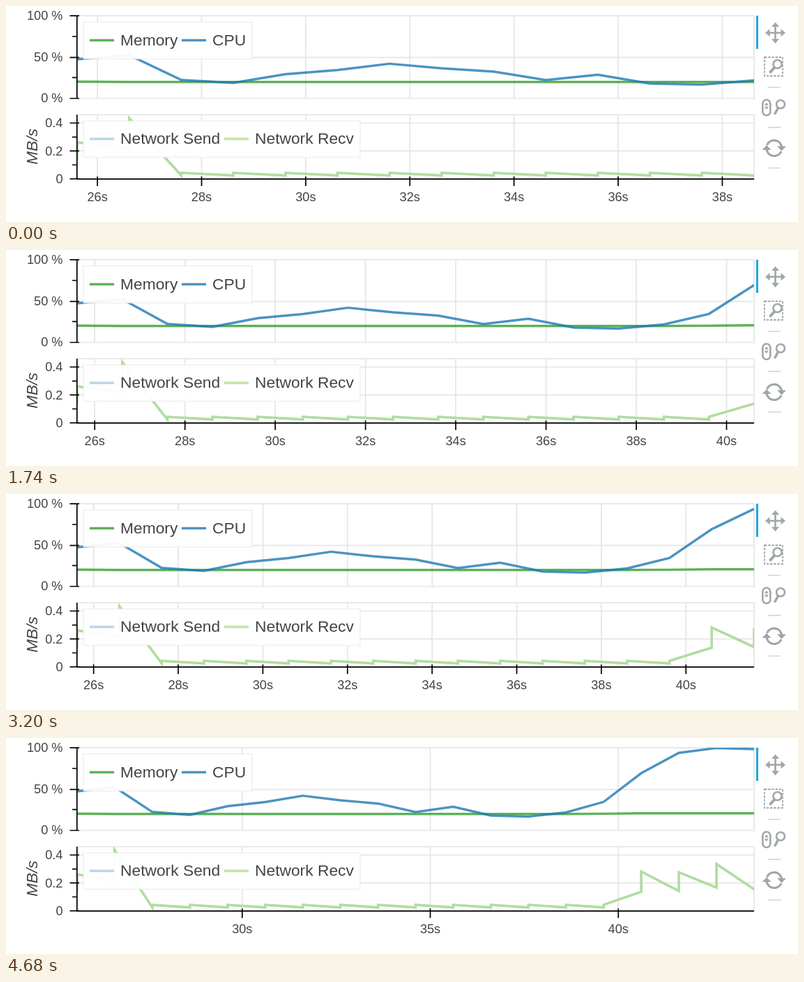
These frames come from a looping animation (1136 px wide and 312 px high, 4.94 s). An HTML page:

```html
<!DOCTYPE html>
<html lang="en">
<head>
<meta charset="utf-8">
<title>Resource monitor</title>
<style>
html, body { margin: 0; width: 100%; height: 100%; overflow: hidden; background: #fff; }
svg { display: block; width: 1136px; height: 312px; font: 18.2px "Liberation Sans", Arial, sans-serif; fill: #444; }
.grid, .frame { fill: none; stroke: #e5e5e5; stroke-width: 1.7; }
.axis { fill: none; stroke: #000; stroke-width: 1.7; }
.line { fill: none; stroke-width: 3.42; stroke-opacity: .8; stroke-miterlimit: 10; }
.mem { stroke: #33a02c; }
.cpu { stroke: #1f78b4; }
.send { stroke: #a6cee3; }
.recv { stroke: #b2df8a; }
.legend { font-size: 22.8px; }
.legend rect { fill: #fff; fill-opacity: .95; stroke: #e5e5e5; stroke-opacity: .5; stroke-width: 1.7; }
.end { text-anchor: end; }
.mid { text-anchor: middle; }
.icon { fill: none; stroke: #a1a6a9; stroke-width: 2.6; }
.solid { fill: #a1a6a9; stroke: none; }
</style>
</head>
<body>
<svg viewBox="0 0 1136 312">
  <defs>
    <clipPath id="top"><rect x="102" y="14" width="971" height="120"/></clipPath>
    <clipPath id="low"><rect x="102" y="157" width="971" height="93"/></clipPath>
  </defs>

  <path class="grid" d="M102 74.3H1073M102 169H1073M102 209.3H1073"/>
  <path class="grid" id="grid"/>
  <path class="frame" d="M102 14.2H1073V133.5H102zM102 157H1073V250H102z"/>

  <g clip-path="url(#top)">
    <path class="line mem" id="mem"/>
    <path class="line cpu" id="cpu"/>
  </g>
  <g clip-path="url(#low)">
    <path class="line send" id="send"/>
    <path class="line recv" id="recv"/>
  </g>

  <path class="axis" d="M101.8 13.4V134.2M91.5 14.2H105M91.5 74.3H105M91.5 133.5H105M95 44H102M95 103.3H102"/>
  <path class="axis" d="M101.8 157V250.7M91.5 169H105M91.5 209.3H105M91.5 249.6H105M95 189.3H102M95 229.5H102M101 249.8H1073"/>
  <path class="axis" id="ticks"/>
  <g class="end">
    <text x="81.5" y="19.6">100 %</text>
    <text x="81.5" y="80.3">50 %</text>
    <text x="81.5" y="139.3">0 %</text>
    <text x="81.5" y="175.3">0.4</text>
    <text x="81.5" y="215.5">0.2</text>
    <text x="81.5" y="255.5">0</text>
  </g>
  <text class="mid" transform="translate(44.5 203) rotate(-90)" font-size="22.8" font-style="italic">MB/s</text>
  <g class="mid" id="labels"></g>

  <g class="legend">
    <rect x="111" y="23" width="242" height="53.5"/>
    <path class="line mem" d="M120 49.5h35"/>
    <text x="164" y="57">Memory</text>
    <path class="line cpu" d="M252 49.5h35"/>
    <text x="296" y="57">CPU</text>
    <rect x="111" y="166" width="397" height="52.5"/>
    <path class="line send" d="M120 192h35"/>
    <text x="164" y="199.3">Network Send</text>
    <path class="line recv" d="M313 192h35"/>
    <text x="357" y="199.3">Network Recv</text>
  </g>

  <path fill="#26aae1" d="M1075.8 14h3.2v48h-3.2z"/>
  <path d="M1093 117.5h18M1093 175.3h18M1093 234h18" stroke="#d3d3d3" stroke-width="1.7"/>
  <g class="icon">
    <path d="M1092 38.7h23M1103.5 27v23"/>
    <path class="solid" d="M1103.5 23.5l5.5 6.5h-11zM1103.5 54l5.5-6.5h-11zM1089 38.7l6.5-5.5v11zM1118 38.7l-6.5-5.5v11z"/>
    <rect x="1088" y="74" width="26" height="27" stroke-width="1.8" stroke-dasharray="3.4 1.8"/>
    <circle cx="1106.5" cy="84" r="6"/>
    <path d="M1102.5 88.5l-7 8" stroke-width="4"/>
    <rect x="1085.3" y="135.5" width="11" height="22.5" rx="5.5"/>
    <path class="solid" d="M1090.8 139.5l3 4h-6zM1090.8 149.5l3-4h-6z"/>
    <circle cx="1111" cy="142" r="6"/>
    <path d="M1107.5 147l-5 9.5" stroke-width="3.6"/>
    <path d="M1091.5 201A11 11 0 0 1 1112.5 203M1112 210A11 11 0 0 1 1091 207" stroke-width="3.2"/>
    <path class="solid" d="M1106 202.5h13l-6.5 7zM1084.5 208h13l-6.5-7z"/>
  </g>
</svg>
<script>
const LEFT = 102, WIDTH = 971, START = 25.61, LOOP = 4940;
const arrivals = [0, 740, 1740, 2740, 3780, 4680];   // a new sample rescales the time axis
const steps = [180, 1190, 2200, 3200, 4210, LOOP];   // its network value then jumps
const flat = y => Array(13).fill(y);

const cpu = [77, 71, 106.8, 111, 98.5, 92.5, 83.4, 90, 94.7, 107, 99.3, 112, 113.5, 107.5, 92.3, 50.8, 21.5, 14.5, 16];
const mem = cpu.map((_, i) => i < 1 ? 109.3 : i < 14 ? 109.7 : i < 15 ? 109.4 : 108.8);
const before = [223, 206, ...flat(244.7), 222, 221, 216, 218.5];
const after = [197, 162, ...flat(241), 193, 194, 182];

const $ = id => document.getElementById(id);
const draw = (id, d) => $(id).setAttribute("d", d);
const path = points => "M" + points.map(p => p.join(" ")).join("L");

function render(n, stepped) {
  const scale = WIDTH / n;
  const x = i => +(LEFT + i * scale).toFixed(2);
  const trace = ys => path(ys.slice(0, n + 1).map((y, i) => [x(i), y]));
  draw("cpu", trace(cpu));
  draw("mem", trace(mem));

  const net = [];
  for (let i = 0; i <= n; i++) {
    net.push([x(i), before[i]]);
    if (i < n || stepped) net.push([x(i), after[i]]);
  }
  draw("send", path(net));
  draw("recv", path(net));

  const gap = n > 17 ? 5 : 2;
  let grid = "", ticks = "", labels = "";
  for (let s = Math.ceil(START / gap) * gap; s < START + n; s += gap) {
    const tx = x(s - START);
    grid += `M${tx} 14V133.5M${tx} 157V250`;
    ticks += `M${tx} 246.3V260`;
    labels += `<text x="${tx}" y="282">${s}s</text>`;
  }
  draw("grid", grid);
  draw("ticks", ticks);
  $("labels").innerHTML = labels;
}

let shown, begin;
function tick(now) {
  begin ??= now;
  const t = (now - begin) % LOOP;
  const k = arrivals.findLastIndex(a => t >= a);
  const stepped = t >= steps[k];
  const state = k * 2 + stepped;
  if (state !== shown) render(13 + k, stepped);
  shown = state;
  requestAnimationFrame(tick);
}
render(13, false);
requestAnimationFrame(tick);
</script>
</body>
</html>
```
